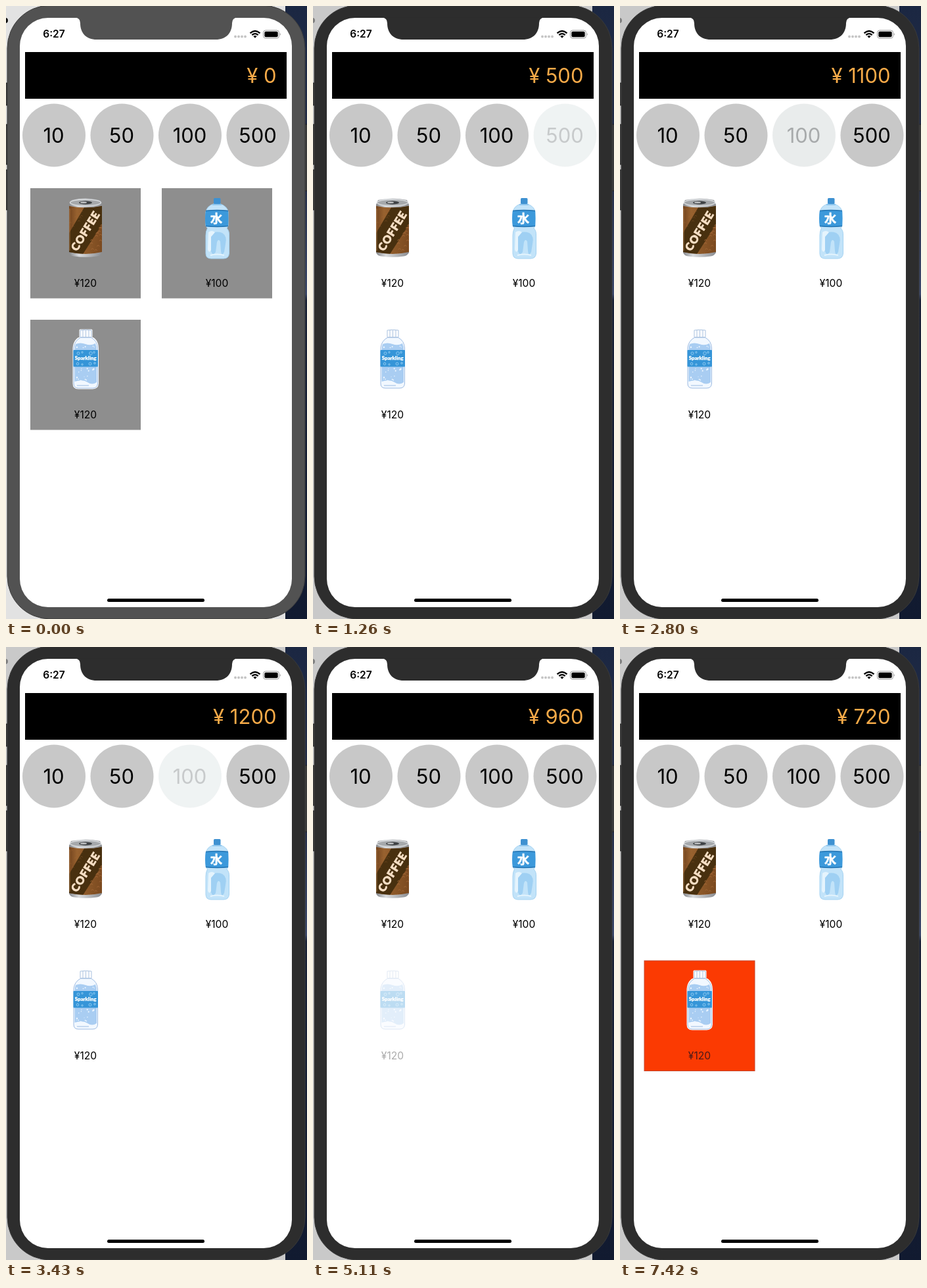
An HTML page for the animation above (7490 ms loop, 458 by 932 pixels).

```html
<!DOCTYPE html>
<html lang="en">
<head>
<meta charset="utf-8">
<title>Vending machine</title>
<style>
  html, body { margin: 0; width: 100%; height: 100%; overflow: hidden; background: #fff; }
  svg { display: block; width: 458px; height: 932px; }
  text { font-family: Inter, "Liberation Sans", sans-serif; }
  .mid { text-anchor: middle; }
  .coin text { font-size: 31px; }
  .price { font-size: 15.6px; }
</style>
</head>
<body>
<svg viewBox="0 0 458 932" xmlns="http://www.w3.org/2000/svg">
  <defs>
    <linearGradient id="desk" x2="0" y2="1">
      <stop offset="0" stop-color="#1b2742"/>
      <stop offset=".3" stop-color="#27304a"/>
      <stop offset=".47" stop-color="#3d4a6c"/>
      <stop offset=".48" stop-color="#1a2236"/>
      <stop offset="1" stop-color="#111a30"/>
    </linearGradient>
    <linearGradient id="metal">
      <stop offset="0" stop-color="#84868a"/>
      <stop offset=".3" stop-color="#d9dbde"/>
      <stop offset="1" stop-color="#8b8d91"/>
    </linearGradient>
    <linearGradient id="brown">
      <stop offset="0" stop-color="#70421d"/>
      <stop offset=".25" stop-color="#98622f"/>
      <stop offset="1" stop-color="#7a491f"/>
    </linearGradient>
    <clipPath id="canClip"><path d="M96 304Q121 309 146 304V374Q121 380 96 374Z"/></clipPath>
  </defs>

  <!-- desktop and phone -->
  <rect id="wall" width="458" height="932" fill="#e2e2e2"/>
  <path d="M425 0H458V932H425Z" fill="url(#desk)"/>
  <circle id="spot" cx="-1" cy="22" r="4" fill="#111"/>
  <g fill="#3b3b3b" stroke="#1c1c1c" stroke-width=".8">
    <rect x="-2" y="117" width="7" height="34"/>
    <rect x="-2" y="180" width="7" height="61"/>
    <rect x="-2" y="249" width="7" height="61"/>
    <rect x="452" y="180" width="8" height="101"/>
  </g>
  <rect id="body" x="2" y="-1" width="453" height="933" rx="65" stroke="#3a3a3a" stroke-width="1"/>
  <rect x="21" y="18" width="414" height="896" rx="43" fill="#fff"/>
  <path id="notch" d="M105 17.5Q113 18 113 26C113 41 122 51 138 51H319C335 51 344 41 344 26Q344 18 352 17.5Z"/>

  <!-- status bar -->
  <text class="mid" x="73" y="48.3" font-size="15.5" font-weight="600">6:27</text>
  <g fill="#c4c4c4">
    <circle cx="349" cy="46.5" r="1.9"/><circle cx="354" cy="46.5" r="1.9"/>
    <circle cx="359" cy="46.5" r="1.9"/><circle cx="364" cy="46.5" r="1.9"/>
  </g>
  <g fill="none" stroke="#000" stroke-width="2.3">
    <path d="M371.5 41.3Q379 34.6 386.500 41.300"/>
    <path d="M374.300 44.200Q379 40 383.700 44.200"/>
  </g>
  <path d="M376.300 46Q379 43.800 381.700 46L379 48.700Z"/>
  <rect x="391.500" y="37" width="24" height="12" rx="3.500" fill="none" stroke="#999"/>
  <rect x="393.300" y="38.800" width="20.400" height="8.400" rx="2"/>
  <path d="M417 41Q419 43 417 45Z" fill="#999"/>

  <!-- money display -->
  <rect x="29" y="70" width="398" height="71"/>
  <text id="money" x="411.500" y="117" font-size="31" text-anchor="end" fill="#f6aa48"></text>

  <g id="coins"></g>
  <g id="tiles"></g>

  <g id="coffee">
    <path d="M96 302L99 295Q121 290 143 295L146 302V375Q143 380 138 380.500Q121 383 104 380.500Q98 380 96 375Z" fill="url(#metal)"/>
    <g clip-path="url(#canClip)">
      <rect x="95" y="300" width="52" height="82" fill="url(#brown)"/>
      <path d="M95 347L121 303H148V329L114 382H95Z" fill="#48300f"/>
      <g id="grain" fill="none" stroke="#a96c3b" stroke-width="1"></g>
      <path d="M97 308V372" stroke="#c08a55" stroke-width="2" opacity=".35"/>
    </g>
    <ellipse cx="121" cy="299" rx="23.500" ry="4.800" fill="#a5a8ab" stroke="#d7dadd" stroke-width="1.500"/>
    <ellipse cx="121" cy="299" rx="10" ry="2.500" fill="#3e4144"/>
    <ellipse cx="118" cy="298.700" rx="5" ry="1.200" fill="#c4c6c8"/>
    <text class="mid" transform="translate(126 345) rotate(-58)" font-size="16.500" letter-spacing="1"
      style="font-family:Lato,sans-serif;font-weight:900" fill="#f6dfc5" stroke="#f6dfc5" stroke-width=".7">COFFEE</text>
    <text class="price mid" x="121" y="427">¥120</text>
  </g>

  <g id="water">
    <path d="M315.500 301H326.500Q337 305 338 313V334L336 338Q340 342 339.500 349V376Q339 384 331 384H312Q304 384 304 376V349Q304 342 306.500 338L304 334V313Q306 304 315.500 301Z" fill="#c2e3f9" stroke="#a5d3f2" stroke-width="1"/>
    <rect x="316" y="292" width="10.500" height="9" rx="1.500" fill="#3e91d1"/>
    <path d="M314 302H328" stroke="#8ec6ee" stroke-width="2"/>
    <path d="M311 348Q318 341 329 345Q337 350 334 362L332 374Q328 382 327 372L326 358Q323 353 321 359L319 374Q315 381 312 373Z" fill="#9fd0f3"/>
    <path d="M308 344Q313 340 318 344L312 351V371Q309 377 307 370Z" fill="#e5f4fd"/>
    <path d="M311 379Q321 376 332 379" fill="none" stroke="#e5f4fd" stroke-width="2"/>
    <path d="M304 311Q321 309 338 311Q339 323 338 335Q321 337 304 335Q302 323 304 311Z" fill="#3c99db"/>
    <path d="M304 311.500Q321 309.500 338 311.500M304 334.500Q321 336.500 338 334.500" fill="none" stroke="#2274b3" stroke-width="1.300"/>
    <text class="mid" x="320" y="330" font-size="18.500" fill="#fff" stroke="#fff" stroke-width=".5"
      style="font-family:'Noto Sans CJK JP','Noto Sans CJK',sans-serif;font-weight:700">水</text>
    <text class="price mid" x="321" y="427">¥100</text>
  </g>

  <g id="soda">
    <path id="sodaEdge" d="M113 493H130V504Q139 508 139.500 520V574Q139 581 132 581H110Q103 581 103 574V520Q104 508 113 504Z" fill="#fff" stroke="#fff" stroke-width="3" stroke-linejoin="round"/>
    <path d="M113.500 504H129.500Q139 509 139.500 520V574Q139 581 132 581H110Q103 581 103 574V520Q104 509 113.500 504Z" fill="#f2f8ff" stroke="#9dbbe2" stroke-width="1"/>
    <path d="M106 514Q113 511 121 514T136 513Q138 517 138 523V572Q131 577 124 572T104.500 571V523Q104.500 518 106 514Z" fill="#a9cdf2"/>
    <path d="M113 493Q121 491.500 130 493V503.500H113ZM117 493V503M121.500 493V503M126 493V503" fill="#fff" stroke="#a9c1df" stroke-width="1"/>
    <path d="M108 577H126" stroke="#9dbbe2" stroke-width="1"/>
    <g id="bubbles" fill="#eef7ff"></g>
    <rect x="102.500" y="523" width="37.500" height="25.500" rx="1" fill="#3595d8"/>
    <g fill="none" stroke="#9fd3f5" stroke-width=".8">
      <circle cx="110" cy="528" r="2"/><circle cx="116" cy="526.500" r="1.200"/><circle cx="129" cy="528" r="2.300"/>
      <circle cx="134" cy="526.500" r="1.300"/><circle cx="109" cy="544" r="1.800"/><circle cx="116" cy="545" r="1.200"/>
      <circle cx="128" cy="544" r="2"/><circle cx="135" cy="543" r="1.300"/>
    </g>
    <text class="mid" x="121.200" y="538" font-size="7.800" fill="#fff" stroke="#fff" stroke-width=".25"
      style="font-family:Lato,sans-serif;font-weight:900">Sparkling</text>
    <text id="sodaPrice" class="price mid" x="121" y="627">¥120</text>
  </g>

  <rect x="154" y="901" width="148" height="5" rx="2.500"/>
</svg>
<script>
const LOOP = 7490, STEP = 70, FADE = 450;
const FOCUS = 560, ENABLED = 1260, SOLD_OUT = 6160;

// [time, amount shown]
const MONEY = [[0, 0], [1260, 500], [2030, 1000], [2730, 1100], [3430, 1200],
  [4340, 1080], [5040, 960], [5600, 840], [6160, 720]];

// [touch down, touch up]
const TAPS = {
  coin500: [[980, 1260], [1750, 2030]],
  coin100: [[2520, 2730], [3220, 3430]],
  coffee: [[4130, 4340]],
  soda: [[4830, 5040], [5390, 5600], [5950, 6160]]
};

const $ = id => document.getElementById(id);
const set = (id, name, value) => $(id).setAttribute(name, value);

function add(parent, tag, attrs, text = "") {
  const el = document.createElementNS("http://www.w3.org/2000/svg", tag);
  for (const key in attrs) el.setAttribute(key, attrs[key]);
  el.textContent = text;
  return parent.appendChild(el);
}

function random(seed) {
  return () => (seed = seed * 16807 % 2147483647) / 2147483647;
}

[10, 50, 100, 500].forEach((value, i) => {
  const cx = 73 + i * 103.5;
  add($("coins"), "circle", { cx, cy: 196.5, r: 47.7, fill: "#fafeff" });
  const coin = add($("coins"), "g", { id: "coin" + value, class: "coin" });
  add(coin, "circle", { cx, cy: 196.5, r: 48, fill: "#c8c8c8" });
  add(coin, "text", { x: cx - 0.5, y: 208, class: "mid" }, value);
});

[[37, 277], [237, 277], [37, 477]].forEach(([x, y], i) =>
  add($("tiles"), "rect", { id: "tile" + i, x, y, width: 168, height: 167.5 }));

const rnd = random(71);
for (let i = 0; i < 60; i++) {
  const x = 96 + rnd() * 50, y = 305 + rnd() * 74;
  const side = (x - 121) * 0.84 + (y - 342) * 0.54;
  if (side > 14 || side < -17)
    add($("grain"), "path", { d: `M${x} ${y}q2 -3 4 0`, opacity: side > 0 ? 0.8 : 0.3 });
}
for (let i = 0; i < 22; i++) {
  const y = i < 6 ? 514 + rnd() * 8 : 551 + rnd() * 20;
  add($("bubbles"), "circle", { cx: 107 + rnd() * 28, cy: y, r: 0.5 + rnd() * 0.8 });
}

function alphaAt(taps, t) {
  const tap = taps.filter(([down]) => down <= t).pop();
  if (!tap) return 1;
  const p = Math.max(0, Math.min(1, (t - tap[1]) / FADE));
  return 0.2 + 0.8 * p;
}

function draw(t) {
  const active = t >= FOCUS, sold = t >= SOLD_OUT;
  const shell = active ? "#2d2d2d" : "#525252";
  set("body", "fill", shell);
  set("notch", "fill", shell);
  set("wall", "fill", active ? "#c9c9c9" : "#e2e2e2");
  set("spot", "opacity", active ? 0.4 : 1);

  $("money").textContent = "¥ " + MONEY.filter(([at]) => at <= t).pop()[1];
  for (const id in TAPS) set(id, "opacity", alphaAt(TAPS[id], t));

  const tile = t < ENABLED ? "#8e8e8e" : "#fff";
  set("tile0", "fill", tile);
  set("tile1", "fill", tile);
  set("tile2", "fill", sold ? "#fb3a02" : tile);
  set("tile2", "stroke", sold ? "#c4462c" : "none");
  set("sodaPrice", "fill", sold ? "#4d1a1a" : "#000");
}

const start = performance.now();
function tick() {
  const t = (performance.now() - start) % LOOP;
  draw(Math.floor(t / STEP) * STEP);
  requestAnimationFrame(tick);
}
tick();
</script>
</body>
</html>
```
